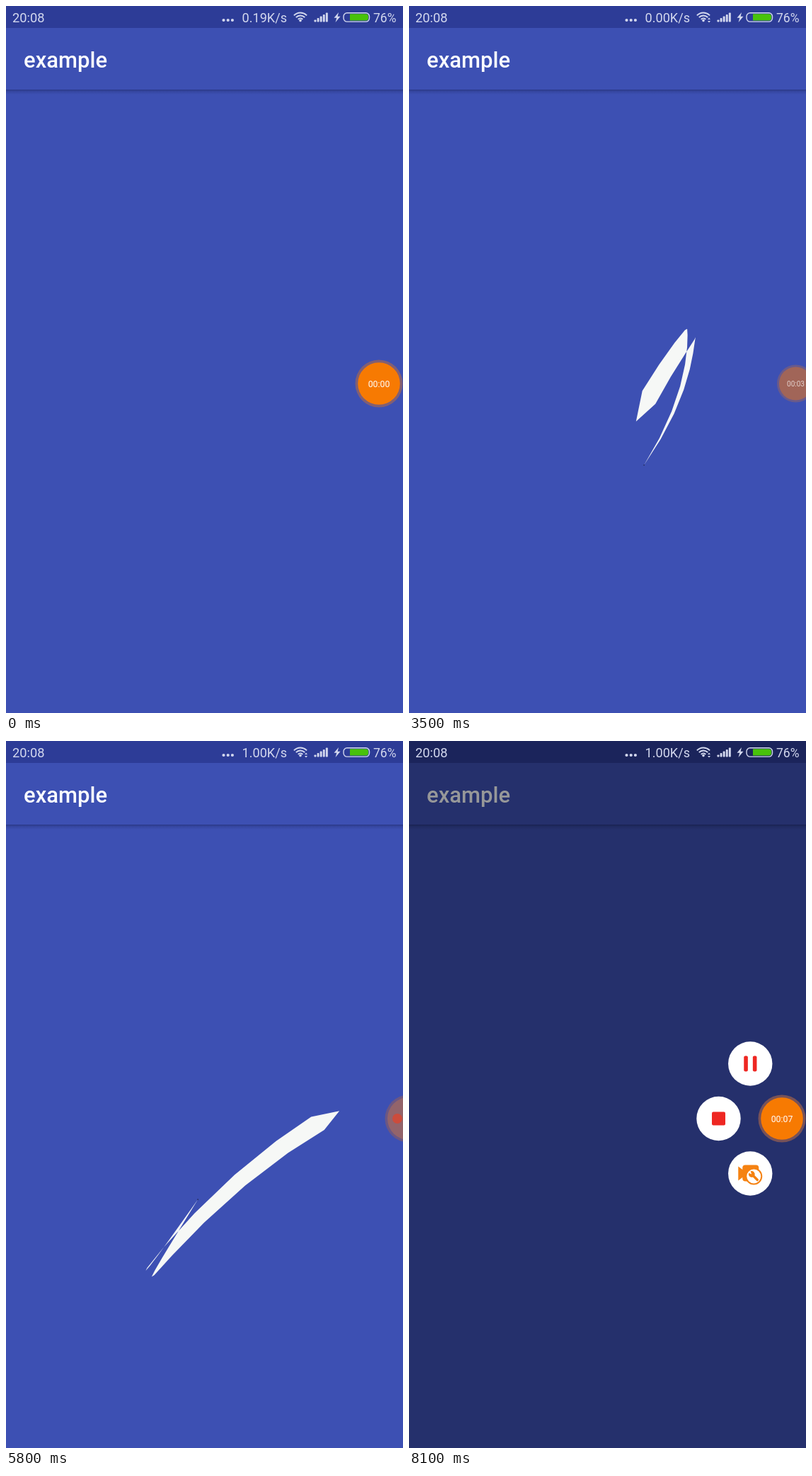
Animation, 561 px wide and 998 px high, one loop 8300 ms. Source, as an HTML page with a canvas:

```html
<!DOCTYPE html>
<html lang="en">
<head>
<meta charset="utf-8">
<title>example</title>
<style>
html, body { margin: 0; width: 100%; height: 100%; overflow: hidden; background: #3d50b3; }
canvas { display: block; width: 561px; height: 998px; }
</style>
</head>
<body>
<canvas id="stage" width="561" height="998"></canvas>
<script>
const W = 561, H = 998, LOOP = 8300, TICK = 100;
const STEP = 17, TRAIL = 13, GROW = 0.84;
const HIDE = 1400, DOT = 5200, MENU = 7300;
const g = document.getElementById('stage').getContext('2d');
const FONT = 'Roboto, "Open Sans", sans-serif';

const clamp = (v) => Math.max(0, Math.min(1, v));
const mix = (a, b, p) => a + (b - a) * p;
const swing = (p) => (1 - Math.cos(Math.PI * p)) / 2;

let seed = 11;
function random(lo, hi) {
  seed = (seed * 16807) % 2147483647;
  return mix(lo, hi, seed / 2147483647);
}

// A swipe is a chain of eased quadratic strokes, each [duration, control, end].
// After the given ones the finger keeps swinging between two corners until `until`.
function swipe(start, from, until, strokes = []) {
  const chain = [];
  let t = start, a = from;
  const add = (dur, c, b) => {
    chain.push({ t, dur, a, c, b });
    t += dur;
    a = b;
  };
  strokes.forEach((s) => add(...s));
  while (t < until) {
    const b = a[1] < 560 ? [random(110, 220), random(590, 730)] : [random(370, 470), random(310, 440)];
    const bend = random(-50, 50);
    add(random(150, 210), [(a[0] + b[0]) / 2 + bend, (a[1] + b[1]) / 2 + bend], b);
  }
  return { start, end: until, chain };
}

const LOW = [180, 690], HIGH = [430, 340];
const swipes = [
  swipe(620, LOW, 1440),
  swipe(1490, HIGH, 2080),
  swipe(2181, [297, 571], 2860, [[130, [235, 651], [174, 729]]]),
  swipe(2900, HIGH, 3150),
  swipe(3209, [240, 760], 4080, [[213, [396, 600], [399, 461]], [105, [346, 531], [309, 611]]]),
  swipe(4180, LOW, 4520),
  swipe(4622, [100, 640], 5050, [[180, [300, 360], [414, 327]], [120, [325, 482], [198, 607]]]),
  swipe(5120, HIGH, 5420),
  swipe(5489, [358, 516], 5980, [[200, [280, 634], [201, 753]], [122, [329, 598], [477, 519]]]),
  swipe(6050, HIGH, 6690)
];

function fingerAt(chain, t) {
  const s = chain.findLast((s) => s.t <= t);
  const p = swing(clamp((t - s.t) / s.dur));
  return [0, 1].map((k) => mix(mix(s.a[k], s.c[k], p), mix(s.c[k], s.b[k], p), p));
}

function disc(x, y, r, color) {
  g.fillStyle = color;
  g.beginPath();
  g.arc(x, y, r, 0, 7);
  g.fill();
}

function box(x, y, w, h, r, color) {
  g.fillStyle = color;
  g.beginPath();
  g.roundRect(x, y, w, h, r);
  g.fill();
}

function poly(pts, color) {
  g.fillStyle = color;
  g.beginPath();
  pts.forEach(([x, y]) => g.lineTo(x, y));
  g.closePath();
  g.fill();
}

function label(text, x, y, font, color, align = 'left') {
  g.font = font + ' ' + FONT;
  g.fillStyle = color;
  g.textAlign = align;
  g.fillText(text, x, y);
}

// Blade: both edges are shifted along the same diagonal, growing towards the finger
function drawTrail({ start, end, chain }, t) {
  const pts = [];
  for (let i = TRAIL - 1; i >= 0; i--) {
    const s = t - i * STEP;
    if (s >= start && s <= end) pts.push(fingerAt(chain, s));
  }
  const n = pts.length;
  if (n < 3) return;
  const edge = (sign) => pts.map(([x, y], i) => {
    const w = i === n - 1 ? 0 : sign * GROW * i;
    return [x + w, y + w];
  });
  poly([...edge(-1), ...edge(1).reverse()], '#f6f8f6');
  disc(...pts[0], 0.9, '#27305f');
}

function drawPage() {
  g.fillStyle = '#3d50b3';
  g.fillRect(0, 0, W, H);
  const shade = g.createLinearGradient(0, 118, 0, 125);
  shade.addColorStop(0, 'rgba(20,28,80,0.45)');
  shade.addColorStop(0.4, 'rgba(20,28,80,0.18)');
  shade.addColorStop(1, 'rgba(20,28,80,0)');
  g.fillStyle = shade;
  g.fillRect(0, 118, W, 7);
  g.fillStyle = '#2d3c97';
  g.fillRect(0, 0, W, 31);
  label('example', 25, 87, '500 31px', '#fbfcff');
}

function drawStatus(t) {
  const ink = '#d3d8ee';
  const speed = t < 1000 ? '0.19' : t < DOT ? '0.00' : '1.00';
  label('20:08', 9, 22.5, '18.3px', ink);
  label(speed + 'K/s', 397, 22.5, '18.1px', ink, 'right');
  label('76%', 551.5, 22.5, '17.5px', ink, 'right');
  for (let i = 0; i < 3; i++) disc(307.5 + i * 6.2, 20, 2.1, ink);

  g.strokeStyle = ink;
  g.lineWidth = 1.9;
  for (let r = 4.5; r < 13; r += 4) {
    g.beginPath();
    g.arc(416, 22, r, -Math.PI * 0.76, -Math.PI * 0.24);
    g.stroke();
  }
  disc(416, 20.6, 1.8, ink);
  if (t >= 2600) {
    poly([[422, 19], [424, 16.5], [426, 19]], ink);
    poly([[422, 21], [424, 23.5], [426, 21]], ink);
  }

  for (let i = 0; i < 5; i++) {
    const h = 3 + i * 2.5;
    box(435.5 + i * 4.1, 22.5 - h, 2.9, h, 0.8, ink);
  }
  poly([[470, 9], [463.5, 16.8], [467.3, 16.8], [465.5, 23], [472.5, 14.8], [468.6, 14.8]], ink);

  g.lineWidth = 1.4;
  g.beginPath();
  g.roundRect(477, 9.7, 36.5, 12.4, 5);
  g.stroke();
  box(486, 11.2, 26, 9.4, [0.5, 3.5, 3.5, 0.5], '#48c20b');
}

// Timer button: full size, then tucked against the edge, then a recording dot
function drawButton(t) {
  if (t >= DOT && t < MENU) {
    disc(569, 533, 33.5, '#6b5784');
    disc(569, 533, 30, '#93646b');
    disc(553, 533, 7, '#cc4c3c');
    return;
  }
  const p = t < MENU ? swing(clamp((t - HIDE) / 300)) : 0;
  const x = mix(527, 546.5, p), r = mix(33.5, 26.5, p);
  const tone = (a, b) => Math.round(mix(a, b, p));
  disc(x, 533, r, `rgba(176,105,75,${mix(0.6, 0.38, p)})`);
  disc(x, 533, r * 0.89, `rgb(${tone(247, 161)},${tone(122, 101)},${tone(2, 88)})`);
  const secs = Math.min(7, Math.floor(t / 1000));
  label('00:0' + secs, x, mix(538, 537, p), mix(12.3, 10, p) + 'px',
    `rgba(255,255,255,${mix(1, 0.7, p)})`, 'center');
}

function pauseIcon() {
  for (const x of [-9, 3.6]) box(x, -11, 5.6, 22, 2, '#ee2722');
}

function stopIcon() {
  box(-9.5, -9.5, 19, 19, 2, '#ee2722');
}

function cameraIcon() {
  const c = '#f58212';
  box(-11, -12, 23, 23, 4, c);
  poly([[-17, -10], [-9, -4], [-9, 4], [-17, 10]], c);
  disc(5, 4, 12, c);
  disc(5, 4, 10, '#ffffff');
  g.strokeStyle = c;
  g.lineCap = 'round';
  g.lineWidth = 3.6;
  g.beginPath();
  g.moveTo(4, 3);
  g.lineTo(10, 9);
  g.stroke();
  g.lineCap = 'butt';
  disc(2, 1, 4.4, c);
  poly([[2, 1], [-3, -1], [0, -4]], '#ffffff');
}

// Three buttons fan out around the timer
function drawMenu(t) {
  const p = swing(clamp((t - MENU + 100) / 200));
  [pauseIcon, stopIcon, cameraIcon].forEach((icon, i) => {
    const angle = Math.PI * (4 + i * 2 - 12) / 6 + Math.PI / 3 * 0;
    const a = Math.PI + (1 - i) * Math.PI / 3;
    g.save();
    g.translate(527 + 89.5 * p * Math.cos(a), 533 - 89.5 * p * Math.sin(a) * -1);
    g.scale(p, p);
    disc(0, 0, 31.2, '#ffffff');
    icon();
    g.restore();
  });
}

function draw(t) {
  drawPage();
  swipes.forEach((s) => drawTrail(s, t));
  g.fillStyle = `rgba(0,0,0,${0.4 * clamp((t - 7400) / 300)})`;
  g.fillRect(0, 0, W, H);
  drawStatus(t);
  if (t >= MENU) drawMenu(t);
  drawButton(t);
}

let start = null;
function loop(now) {
  if (start === null) start = now;
  const t = (now - start) % LOOP;
  draw(Math.floor(t / TICK) * TICK);
  requestAnimationFrame(loop);
}
draw(0);
requestAnimationFrame(loop);
</script>
</body>
</html>
```
